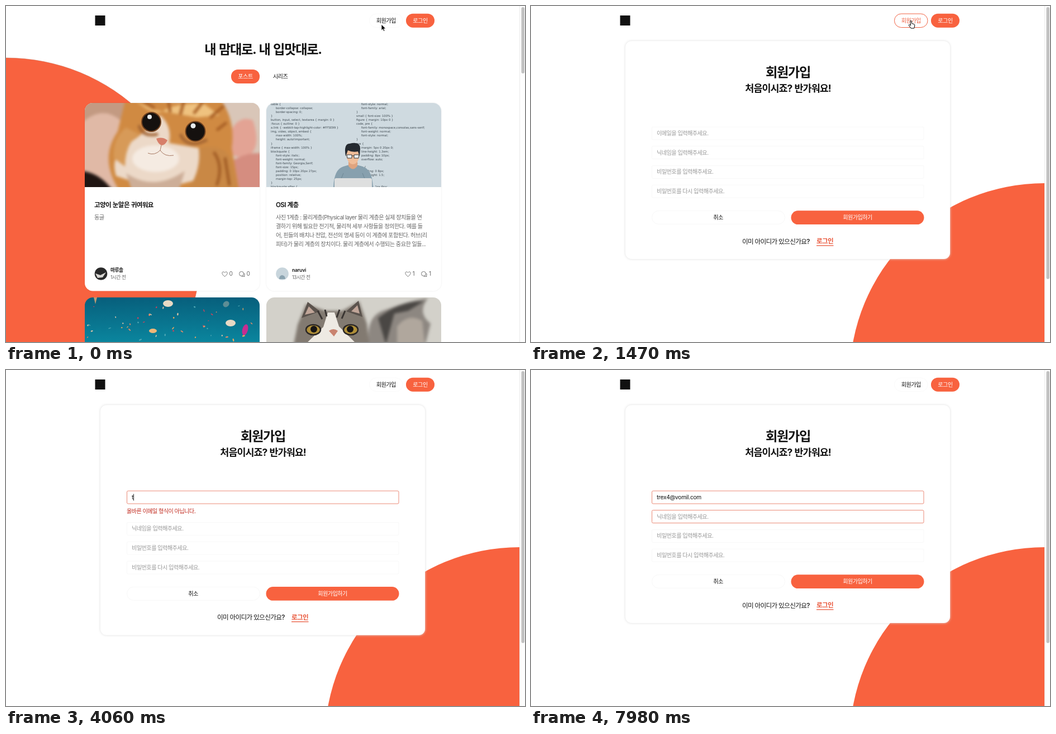
An HTML page for the animation above (8 s loop, 929 by 603 pixels).

```html
<!DOCTYPE html>
<html lang="ko">
<head>
<meta charset="utf-8">
<style>
html, body { margin: 0; width: 100%; height: 100%; overflow: hidden; background: #fff; }
svg { display: block; width: 100%; height: 100%; }
text { font: 10.16px Inter, "Noto Sans CJK KR", "Noto Sans CJK", sans-serif; letter-spacing: -.055em; fill: #111; }
.mid { text-anchor: middle; }
.h1 { font-size: 23.2px; font-weight: 700; word-spacing: .06em; }
.h2 { font-size: 17.4px; font-weight: 700; word-spacing: .06em; }
.h3 { font-size: 11.6px; font-weight: 600; word-spacing: .04em; }
.p { font-size: 11.6px; font-weight: 500; }
.btn { font-weight: 500; }
.gray { fill: #666; }
.hint { fill: #9a9a9a; }
.s { font-size: 8.7px; }
.b { font-weight: 600; }
.w { fill: #fff; }
.latin { letter-spacing: -.025em; }
.o { fill: #f8623f; }
.code text { font: 5.2px "DejaVu Sans", sans-serif; letter-spacing: 0; fill: #3c474e; }
.card { fill: #fff; filter: drop-shadow(0 0 1px rgba(0, 0, 0, .09)); }
.panel { fill: #fff; filter: drop-shadow(.7px .7px 2.2px #dcdcdc); }
.line { fill: #fff; stroke: #f8f8f8; }
.icon { fill: none; stroke: #666; stroke-width: .9; }
.soft { filter: blur(2.5px); }
</style>
</head>
<body>
<svg viewBox="0 0 929 603" preserveAspectRatio="none">
<defs>
  <clipPath id="c1"><path d="M141 325V188.500a14.500 14.500 0 0 1 14.500-14.500h284a14.500 14.500 0 0 1 14.500 14.500V325z"/></clipPath>
  <clipPath id="c2"><path d="M466 325V188.500a14.500 14.500 0 0 1 14.500-14.500h284a14.500 14.500 0 0 1 14.500 14.500V325z"/></clipPath>
  <clipPath id="c3"><rect x="141" y="523" width="313" height="120" rx="14.500"/></clipPath>
  <clipPath id="c4"><rect x="466" y="523" width="313" height="120" rx="14.500"/></clipPath>
  <linearGradient id="sea" x2="0" y2="1"><stop stop-color="#075f7c"/><stop offset="1" stop-color="#0b8aa2"/></linearGradient>
  <g id="heart" class="icon"><path d="M0 4.500C-8-1-4-6.500 0-2.600 4-6.500 8-1 0 4.500z"/></g>
  <g id="talk" class="icon"><circle cx="-1" cy="-.5" r="4"/><path d="M3.400-1.500a3.400 3.400 0 0 1 .7 4.600l.4 1.600-1.900-.5a3.600 3.600 0 0 1-3.600-.4"/></g>
</defs>

<g id="home">
  <circle class="o" cy="441.500" r="348.400" stroke="#c9694f" stroke-width=".5"/>
  <text class="h1 mid" x="460" y="86">내 맘대로. 내 입맛대로.</text>
  <rect class="o" x="403" y="114" width="51" height="25" rx="12"/>
  <text class="btn mid w" x="428.500" y="130.300">포스트</text>
  <text class="btn mid" x="491" y="130.300">시리즈</text>
  <rect class="card" x="141" y="174" width="313" height="337.500" rx="14.500"/>
  <rect class="card" x="466" y="174" width="313" height="337.500" rx="14.500"/>

  <g clip-path="url(#c1)">
    <rect x="141" y="174" width="313" height="151" fill="#d5bda9"/>
    <g class="soft">
      <path d="M130 165h90l-20 60-15 100h-55z" fill="#c39a82"/>
      <path d="M130 215q40-40 75-10l-10 60 20 60h-85z" fill="#e0b9a6"/>
      <path d="M130 296q35 0 60 34h-60z" fill="#1f1512"/>
      <path d="M375 165h90v170H360z" fill="#d9c6b8"/>
      <path d="M402 225q15-30 40-20 15 45-5 62-20 10-40-5z" fill="#e3a394"/>
      <path d="M400 280q35-20 60-15v65h-60z" fill="#d58d80"/>
      <path d="M218 150q70 40 160 10 34 40 26 95l14 80H205q-40-60-5-110z" fill="#d08a42"/>
      <path d="M232 170q35 30 50 18t70-14l30 22-40 4-80-14z" fill="#efc27f"/>
      <path d="M238 165l28 18m24-18l4 26m26-26l-8 30m46-30l-22 28m54-14l-25 22m30 8l-18 14" stroke="#a85f25" stroke-width="5"/>
      <path d="M276 196q22 20 16 50l60 10q20 34-10 56l-70 18-75-25q-12-38 25-60 30-20 54-49z" fill="#ecd9c8"/>
      <path d="M215 218q-25 20-22 55l20 15q0-40 25-58z" fill="#d79a58"/>
      <path d="M345 255q45-10 58 20l12 55h-90q25-35 20-75z" fill="#c98845"/>
      <path d="M372 262q18 25 5 60m15-50l8 50" fill="none" stroke="#a15c25" stroke-width="5"/>
      <ellipse cx="268" cy="274" rx="42" ry="24" fill="#f5ebe2"/>
      <path d="M215 300q50 34 105-4l-10 34h-85z" fill="#cdae98"/>
      <path d="M238 214q6 22 34 16m40 0q12 28 48 10" fill="none" stroke="#a06232" stroke-width="5"/>
    </g>
    <g fill="#15110f" stroke="#70411f" stroke-width="2">
      <circle cx="260" cy="208" r="17"/><circle cx="339" cy="225" r="17.500"/>
    </g>
    <g fill="#e6eaec"><circle cx="257" cy="199" r="4"/><circle cx="335" cy="215" r="4.500"/></g>
    <path d="M269 238q11-4 20 3-4 9-11 9-6-3-9-12z" fill="#d77f6a"/>
    <path d="M278 250l-2 9q-10 10-22 5m22-5q8 12 24 9" fill="none" stroke="#a77862"/>
  </g>

  <g clip-path="url(#c2)">
    <rect x="466" y="174" width="313" height="151" fill="#cfdae0"/>
    <g class="code" id="code"></g>
    <path d="M586 326q1-33 18-38l17-5 17 5q18 5 19 38z" fill="#87a0ae"/>
    <path d="M613 276h16v11q-8 11-16 0z" fill="#dfa47f"/>
    <ellipse cx="621" cy="267" rx="11.500" ry="17" fill="#f0bd98"/>
    <path d="M608 270q-4-23 7-23 19-5 19 9l-1 14-3-9q-10 2-18-2z" fill="#252a30"/>
    <path d="M610 267h9v6h-8zm13 0h9l-1 6h-8zm-4 2h4" fill="#eef3f5" stroke="#333" stroke-width="1"/>
    <path d="M604 300l-5 12m39-12l5 12" stroke="#6e8795"/>
    <rect x="588" y="309" width="67" height="20" rx="3" fill="#dedfdf"/>
  </g>

  <text class="h3" x="158" y="361">고양이 눈알은 귀여워요</text>
  <text class="gray" x="158" y="383.300">동글</text>
  <text class="h3" x="483" y="361">OSI 계층</text>
  <g>
    <text class="gray" x="483" y="383.300">사진 1계층 : 물리계층(Physical layer 물리 계층은 실제 장치들을 연</text>
    <text class="gray" x="483" y="399.200">결하기 위해 필요한 전기적, 물리적 세부 사항들을 정의한다. 예를 들</text>
    <text class="gray" x="483" y="415.100">어, 핀들의 배치나 전압, 전선의 명세 등이 이 계층에 포함된다. 허브(리</text>
    <text class="gray" x="483" y="431">피터)가 물리 계층의 장치이다. 물리 계층에서 수행되는 중요한 일들...</text>
  </g>
  <circle cx="170" cy="480.500" r="11.300" fill="#292929"/>
  <path d="M160 480l9 3 10-5-6 9-9 1z" fill="#d8d6d2"/>
  <circle cx="494.500" cy="480.500" r="11.300" fill="#c8d5dc"/>
  <path d="M489 490q0-6 5-7 6 1 6 7z" fill="#8ba3b0"/>
  <text class="s b" x="187" y="476.500">마루솔</text>
  <text class="s gray" x="187" y="490.300">1시간 전</text>
  <text class="s b latin" x="512" y="476.500">naruvi</text>
  <text class="s gray" x="512" y="490.300">13시간 전</text>
  <use href="#heart" x="391.500" y="481"/><text class="gray" x="399.500" y="484.300">0</text>
  <use href="#talk" x="422.500" y="481"/><text class="gray" x="430.500" y="484.300">0</text>
  <use href="#heart" x="719.500" y="481"/><text class="gray" x="727.500" y="484.300">1</text>
  <use href="#talk" x="748.500" y="481"/><text class="gray" x="757" y="484.300">1</text>

  <g clip-path="url(#c3)">
    <rect x="141" y="523" width="313" height="90" fill="url(#sea)"/>
    <g id="confetti"></g>
    <g fill="#e8d9c4"><ellipse cx="290" cy="534" rx="9" ry="6"/><ellipse cx="402" cy="569" rx="9" ry="6"/></g>
    <ellipse cx="394" cy="535" rx="6" ry="5" fill="#5d8d95" transform="rotate(-40 394 535)"/>
    <ellipse cx="263" cy="583" rx="7" ry="4" fill="#f0b778"/>
    <ellipse cx="428" cy="581" rx="5" ry="10" fill="#c52d91" transform="rotate(15 428 581)"/>
    <path d="M157 523h6l-3 12z" fill="#b99b75"/>
  </g>
  <g clip-path="url(#c4)">
    <rect x="466" y="523" width="313" height="90" fill="#d3d1ca"/>
    <g class="soft">
      <path d="M650 610q-8-55 30-65 55-20 75-20-20 25 5 45l-10 40z" fill="#8d8781"/>
      <path d="M666 560q40-32 82-30l-28 17-25 5-15 55z" fill="#4a4744"/>
      <path d="M700 575q20-25 45-10l5 45h-50z" fill="#b0a79d"/>
      <path d="M514 612l8-40 15-37 35 12 30 0 30-17 14 40 5 45z" fill="#827a71"/>
    </g>
    <path d="M529 560l11-29 22 17zm80-12l22-19 7 29z" fill="#5b534d"/>
    <path d="M535 554l7-15 11 11zm83-6l11-11 4 15z" fill="#c0a598"/>
    <path d="M576 550h12l8 25 30 30h-88l30-29z" fill="#eeeae3"/>
    <path d="M558 547l8 15m5-17l3 12m23-12l-5 14m15-12l-6 14" stroke="#3a3532" stroke-width="3"/>
    <g fill="#b08f38" stroke="#2b2725" stroke-width="2.500"><ellipse cx="550" cy="581" rx="13" ry="9"/><ellipse cx="617" cy="581" rx="13" ry="9"/></g>
    <g fill="#171514"><circle cx="551" cy="580" r="6"/><circle cx="616" cy="580" r="6"/></g>
    <path d="M578 583q8-6 16 0l-7 10z" fill="#c9836f"/>
  </g>
</g>

<g id="join">
  <circle class="o" cx="919" cy="666.400" r="348.400"/>
  <rect class="panel" id="panel" x="169" y="63" width="581" height="391" rx="11"/>
  <text class="h1 mid" x="460" y="126.500">회원가입</text>
  <text class="h2 mid" x="460" y="154">처음이시죠? 반가워요!</text>
  <rect class="line" id="mailBox" x="216.500" y="217" width="486.500" height="23" rx="2"/>
  <text class="hint" id="mailHint" x="225" y="231.800">이메일을 입력해주세요.</text>
  <text id="mail" x="225" y="231.800"></text>
  <path id="under" stroke="#222" d="M0 234.500h8"/>
  <text class="btn" id="error" x="216" y="257" style="fill:#c0281c">올바른 이메일 형식이 아닙니다.</text>
  <g id="rest">
    <rect class="line" id="nickBox" x="216.500" y="251.600" width="486.500" height="23" rx="2"/>
    <rect class="line" x="216.500" y="286.400" width="486.500" height="23" rx="2"/>
    <rect class="line" x="216.500" y="321.200" width="486.500" height="23" rx="2"/>
    <text class="hint" x="225" y="266.500">닉네임을 입력해주세요.</text>
    <text class="hint" x="225" y="301.300">비밀번호를 입력해주세요.</text>
    <text class="hint" x="225" y="336.100">비밀번호를 다시 입력해주세요.</text>
    <rect class="line" x="216.500" y="367.500" width="238" height="24" rx="12"/>
    <text class="btn mid" x="335" y="383.300">취소</text>
    <rect class="o" x="465.500" y="367.300" width="238" height="24.700" rx="12.300"/>
    <text class="btn mid w" x="584.500" y="383.300">회원가입하기</text>
    <text class="p" x="378" y="426.500">이미 아이디가 있으신가요?</text>
    <text class="h3" x="511" y="426" style="fill:#e9573b">로그인</text>
    <path d="M511 430h30.500" stroke="#e9573b" stroke-width="1.300"/>
  </g>
  <path id="caret" stroke="#111" stroke-width=".9"/>
</g>

<rect x="159.500" y="17" width="18" height="18" fill="#111"/>
<rect class="line" id="joinBox" x="650.500" y="14" width="59.500" height="24.500" rx="12.200"/>
<text class="btn mid" id="joinText" x="680.200" y="29.500">회원가입</text>
<rect class="o" x="716" y="13.700" width="51" height="25" rx="12.400"/>
<text class="btn mid w" x="741.500" y="29.500">로그인</text>

<rect x="919.500" y="-1" width="11" height="605" fill="#fdfdfd" stroke="#ebebeb"/>
<rect id="thumb" x="922.500" y="2" width="5.500" rx="2.700" fill="#c1c1c1"/>

<g id="pointer">
  <path id="arrow" d="M0 0V10.800L2.500 8.500 4.200 12.300 6 11.500 4.400 7.800H7.800z" fill="#000" stroke="#fff" stroke-width=".8"/>
  <path id="hand" d="M-1 0Q0-1.600 1.200 0l.6 4.500 4.200 1.200Q7.200 6.300 6.700 9L5.700 13H.2L-3.800 7.600q0-1.700 1.600-1.100L-.4 8z" fill="#fff" stroke="#000"/>
  <path id="beam" d="M-2-6q2 0 2 1.500 0-1.500 2-1.500M0-5V5m-2 1q2 0 2-1.500 0 1.500 2 1.500" fill="none" stroke="#111"/>
</g>
</svg>
<script>
const LOOP = 8000, JOIN_AT = 1470, FOCUS_AT = 2660, NICK_AT = 7480, VALID_AT = 7210;
const $ = id => document.getElementById(id);
const NS = "http://www.w3.org/2000/svg";
const add = (parent, tag, attrs) => {
  const el = document.createElementNS(NS, tag);
  for (const k in attrs) el.setAttribute(k, attrs[k]);
  return parent.appendChild(el);
};

// Code wall: a leading space marks one indent.
function codeColumn(x, source) {
  source.split("|").forEach((line, i) => {
    const indent = line[0] === " " ? 9 : 0;
    add($("code"), "text", { x: x + indent, y: 178 + i * 7.05 }).textContent = line.trim();
  });
}
codeColumn(474, "table {| border-collapse: collapse;| border-spacing: 0;|}|button, input, select, textarea { margin: 0 }|:focus { outline: 0 }|a.link { -webkit-tap-highlight-color: #FF5E99 }|img, video, object, embed {| max-width: 100%;| height: auto!important;|}|iframe { max-width: 100% }|blockquote {| font-style: italic;| font-weight: normal;| font-family: Georgia,Serif;| font-size: 15px;| padding: 0 10px 20px 27px;| position: relative;| margin-top: 25px;|}|blockquote:after {");
codeColumn(627, " font-style: normal;| font-family: arial;|}|small { font-size: 100% }|figure { margin: 10px 0 }|code, pre {| font-family: monospace,consolas,sans-serif;| font-weight: normal;| font-style: normal;|}|pre {| margin: 5px 0 20px 0;| line-height: 1.3em;| padding: 8px 10px;| overflow: auto;|}|code {| padding: 0 8px;| line-height: 1.5;|}|| padding: 1px 6px;");

let seed = 7;
const rnd = () => (seed = seed * 16807 % 2147483647) / 2147483647;
const tints = ["#e58b68", "#d9c3a8", "#c7445e", "#51a9b5", "#e9a75e"];
for (let i = 0; i < 45; i++) {
  const x = 146 + rnd() * 303, y = 530 + rnd() * 70;
  add($("confetti"), "ellipse", {
    cx: x, cy: y, rx: 1 + rnd() * 1.8, ry: .6 + rnd() * .9,
    fill: tints[i % 5], transform: `rotate(${rnd() * 180} ${x} ${y})`
  });
}

const keys = [[0, ""], [2870, "ㅅ"], [3010, "ㅅㄱ"], [3080, "ㅅㄱㄷ"], [3220, "ㅅㄱㄷㅌ"],
  [3570, "ㅅㄱㄷ"], [3710, "ㅅㄱ"], [3850, "ㅅ"], [3990, ""]];
const address = "trex4@vomil.com";
[4060, 4200, 4270, 4340, 4760, 5600, 5880, 6090, 6230, 6440, 6650, 6860, 7000, 7210, 7280]
  .forEach((at, i) => keys.push([at, address.slice(0, i + 1)]));

const ramp = (t, a, b) => Math.min(1, Math.max(0, (t - a) / (b - a)));
const ease = u => u * u * (3 - 2 * u);
const blend = (from, to, u) => `rgb(${from.map((v, i) => Math.round(v + (to[i] - v) * u))})`;
const show = (id, on) => $(id).style.display = on ? "" : "none";
const PALE = [248, 248, 248], FOCUS = [235, 138, 118], ORANGE = [240, 98, 67], INK = [17, 17, 17];

function drawPointer(t) {
  const near = ease(ramp(t, 140, 420)), go = ease(ramp(t, 1890, 2590));
  const x = 672 + 8 * near - 220 * go, y = 33 - 6 * near + 202 * go;
  const kind = t < 140 ? "arrow" : y < 39 ? "hand" : y > 217 ? "beam" : "arrow";
  for (const id of ["arrow", "hand", "beam"]) show(id, id === kind);
  $("pointer").setAttribute("transform", `translate(${x} ${y})`);
  show("pointer", t < 2870);
}

function drawForm(t) {
  const [typedAt, value] = keys.findLast(k => k[0] <= t);
  const korean = /[ㄱ-ㅎ]/.test(value), bad = value && t < VALID_AT;
  const mail = $("mail");
  mail.textContent = value;
  mail.setAttribute("class", korean ? "" : "latin");
  show("mailHint", !value);
  show("error", bad);
  $("rest").setAttribute("transform", `translate(0 ${bad ? 21.8 : 0})`);
  $("panel").setAttribute("height", bad ? 412.8 : 391);
  $("mailBox").style.stroke = blend(PALE, FOCUS, ramp(t, FOCUS_AT - 70, FOCUS_AT + 70));
  $("nickBox").style.stroke = blend(PALE, FOCUS, ramp(t, NICK_AT - 60, NICK_AT + 80));

  const end = 225 + (value ? mail.getComputedTextLength() : 0);
  show("under", korean && t < 3570);
  $("under").setAttribute("transform", `translate(${end - 8.5} 0)`);
  const nick = t >= NICK_AT;
  const since = t - (nick ? NICK_AT : Math.max(FOCUS_AT, typedAt));
  show("caret", since >= 0 && since % 1000 < 500);
  $("caret").setAttribute("d", nick ? "M225.500 257.500v12" : `M${end + .4} 222.500v12`);
}

function draw(t) {
  const joined = t >= JOIN_AT;
  show("home", !joined);
  show("join", joined);
  $("thumb").setAttribute("height", joined ? 488 : 119);
  const hover = ramp(t, 140, 420) - ramp(t, 2030, 2240);
  $("joinBox").style.stroke = blend([250, 250, 250], ORANGE, hover);
  $("joinText").style.fill = blend(INK, ORANGE, hover);
  if (joined) drawForm(t);
  drawPointer(t);
}

const start = performance.now();
function tick() {
  draw((performance.now() - start) % LOOP);
  requestAnimationFrame(tick);
}
tick();
</script>
</body>
</html>
```
